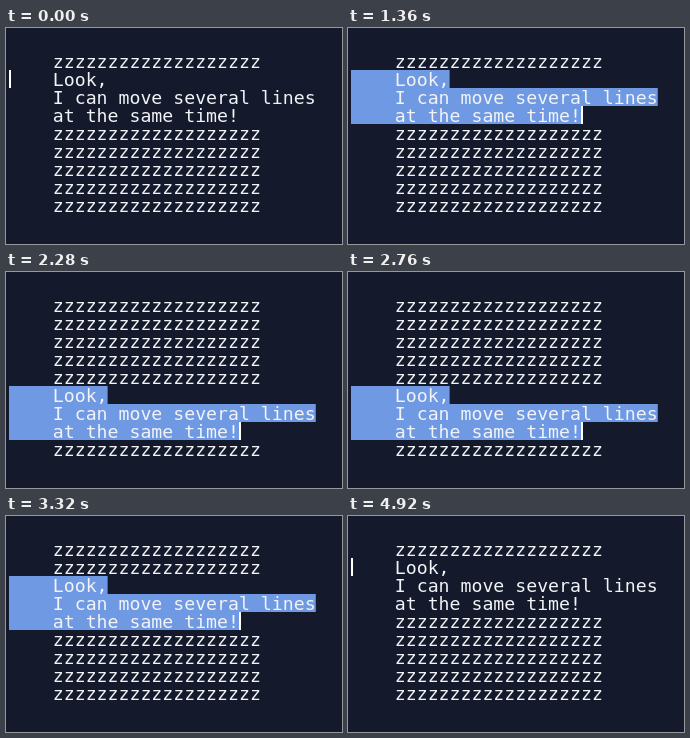
An HTML page that plays this animation: 336 by 216 pixels, repeating every 5 s.

```html
<!DOCTYPE html>
<html lang="en">
<head>
<meta charset="utf-8">
<title>Moving lines</title>
<style>
  html, body { margin: 0; width: 100%; height: 100%; overflow: hidden; background: #141a2b; }
  svg { display: block; width: 336px; height: 216px; }
  text { font: 18.2px "DejaVu Sans Mono", monospace; fill: #f1f3f6; white-space: pre; }
</style>
</head>
<body>
<svg id="stage" viewBox="0 0 336 216"></svg>
<script>
const LOOP = 5000, LEFT = 3, TOP = 24, ROW = 18, CHAR = 18.2 * 0.602, INDENT = 4;
const BLOCK = ["Look,", "I can move several lines", "at the same time!"];
const FILLER = "z".repeat(19);
const ROWS = 9;

// Each key press: [time, first row of block, selected rows, caret row, caret column]
const END = INDENT + BLOCK[2].length;
const moved = (time, row) => [time, row, 3, row + 2, END];
const KEYS = [
  [0, 1, 0, 1, 0],
  [680, 1, 1, 2, 0],
  [960, 1, 2, 3, 0],
  [1160, 1, 3, 4, 0],
  moved(1360, 1),
  moved(1720, 2), moved(1920, 3), moved(2080, 4), moved(2280, 5), moved(2480, 6),
  moved(2760, 5), moved(2920, 4), moved(3120, 3), moved(3280, 2), moved(3560, 1),
  [4080, 1, 0, 4, 0],
  [4240, 1, 0, 3, 0],
  [4440, 1, 0, 2, 0],
  [4640, 1, 0, 1, 0]
];

const stage = document.getElementById("stage");
function add(tag, attrs) {
  const el = document.createElementNS("http://www.w3.org/2000/svg", tag);
  set(el, attrs);
  return stage.appendChild(el);
}
function set(el, attrs) {
  for (const name in attrs) el.setAttribute(name, attrs[name]);
}
const rowY = row => TOP + row * ROW;
const colX = col => LEFT + col * CHAR;

const marks = BLOCK.map(line => add("rect", {
  x: LEFT, width: (INDENT + line.length) * CHAR, height: ROW, fill: "#6f99e3"
}));
const lines = Array.from({ length: ROWS }, (_, row) =>
  add("text", { x: colX(INDENT), y: rowY(row) + 16 }));
const caret = add("rect", { width: 2, height: ROW, fill: "#fff" });

let shown = null;
function draw(time) {
  const key = KEYS.findLast(k => k[0] <= time);
  if (key === shown) return;
  shown = key;
  const [, first, selected, row, col] = key;
  lines.forEach((el, i) => { el.textContent = BLOCK[i - first] ?? FILLER; });
  marks.forEach((el, i) => set(el, {
    y: rowY(first + i), visibility: i < selected ? "visible" : "hidden"
  }));
  set(caret, { x: Math.round(colX(col)), y: rowY(row) });
}

const start = performance.now();
function tick() {
  draw((performance.now() - start) % LOOP);
  requestAnimationFrame(tick);
}
tick();
</script>
</body>
</html>
```
